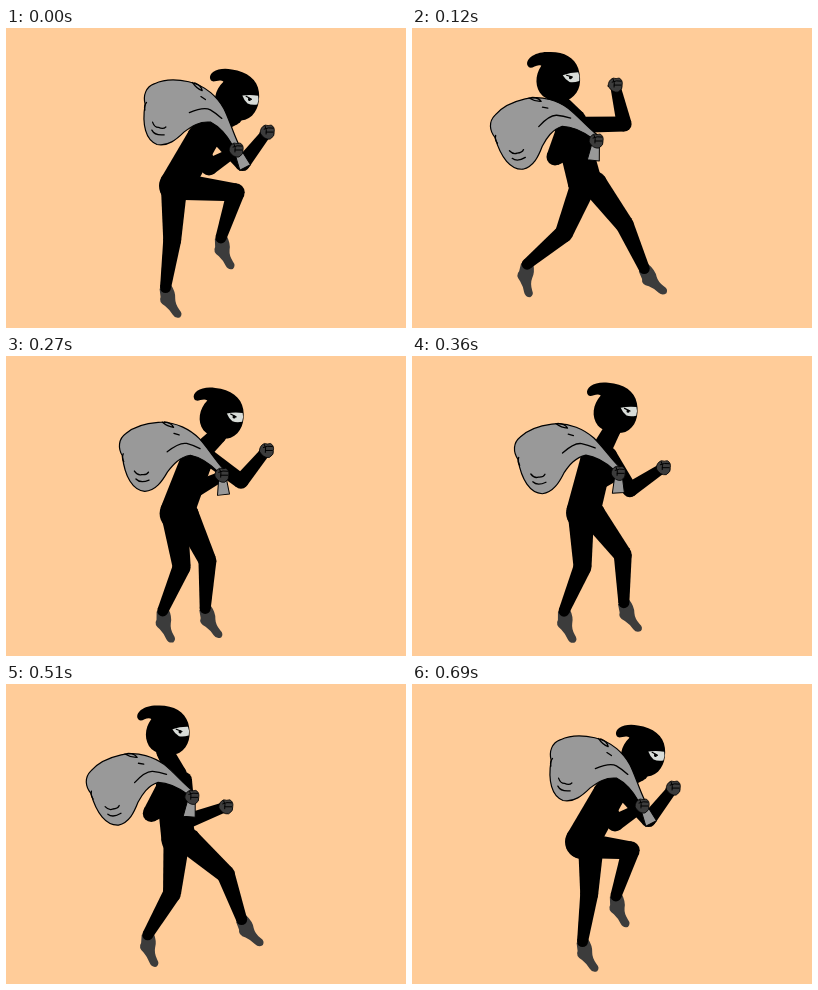
Write an HTML page with a canvas that moves like this. It is 400x300 px and loops after 0.72 s.

```html
<!DOCTYPE html>
<html lang="en">
<head>
<meta charset="utf-8">
<title>Thief on the run</title>
<style>
  html, body { margin: 0; width: 100%; height: 100%; overflow: hidden; background: #fc9; }
  canvas { display: block; }
</style>
</head>
<body>
<canvas id="stage" width="400" height="300"></canvas>
<script>
const ctx = document.getElementById('stage').getContext('2d');
const LOOP = 720, STEP = 30;
const BLACK = '#000', SKIN = '#3c3c3c', SACK = '#999', EYE = '#d8dcd8';
const rad = degrees => degrees * Math.PI / 180;

// Joint angles in degrees at the key times; limbs hang at 0 and swing forward when positive
const KEY_TIMES = [0, 120, 300, 480, 570, 690];
const joints = {
  lean: [35, -14, 33, -12, 8, 35],
  sack: [12, -13, -2, -17, -4, 12],
  upperArm: [42, 91, 46, 2, 14, 42],
  forearm: [142, 193, 130, 110, 111, 142],
  thighA: [-2, -22, 14, -23, 31, 84],
  shinA: [-8, -50, -18, -32, -27, -18],
  thighB: [84, 37, 23, 65, 16, -2],
  shinB: [-18, 24, -8, 20, 18, -8]
};

function poseAt(t) {
  const next = KEY_TIMES.findIndex(k => k > t);
  const i = next < 0 ? KEY_TIMES.length - 1 : next;
  const k = Math.min(1, (t - KEY_TIMES[i - 1]) / (KEY_TIMES[i] - KEY_TIMES[i - 1]));
  const pose = {};
  for (const name in joints) {
    const a = joints[name][i - 1], b = joints[name][i];
    pose[name] = a + (b - a) * k;
  }
  return pose;
}

const shapes = {
  head: new Path2D('M-32-13C-35-19-26-27-12-27C4-28 16-22 20-10C24 2 22 15 12 21C4 25-10 24-17 18C-25 10-25-3-18-13C-22-15-26-11-29-11Q-31-11-32-13Z'),
  eye: new Path2D('M4-3Q12-6 20-6Q22-2 21 3Q15 5 11 4Q7 2 4-3Z'),
  brow: new Path2D('M8-3L14-1'),
  foot: new Path2D('M-6-1L6-1Q8 8 5 14Q3 19 5 26Q7 31 3 33Q-2 33-3 28Q-4 22-7 17Q-12 11-8 7Z'),
  sack: new Path2D('M-98-24C-102-32-101-41-93-46C-85-52-72-55-60-55C-42-55-28-45-20-36C-12-26-6-14 2-4L-4-2C-11-10-19-17-30-20C-41-19-48-12-54-5C-60 4-67 13-78 13C-90 11-97-3-98-24Z'),
  folds: new Path2D('M-97-26Q-99-22-97-18M-54-55Q-47-54-45-49Q-51-50-56-55M-45-43L-40-41M-53-25Q-40-34-33-32Q-27-30-20-26M-87-8Q-84-3-80-4Q-75-3-73-6M-86 0Q-82 5-73 2'),
  tail: new Path2D('M-3 3L4 3L7 21L-5 22Z'),
  hand: new Path2D('M-7 1Q-7-5-2-7Q1-6 4-7Q8-5 7 0Q8 4 3 7Q-3 8-7 1Z'),
  fingers: new Path2D('M-3-3Q1-5 6-4M-1 0L6 0M-2-6Q0-3-1 2')
};

function place(x, y, degrees, draw) {
  ctx.save();
  ctx.translate(x, y);
  ctx.rotate(rad(degrees));
  draw();
  ctx.restore();
}

function fill(shape, color) {
  ctx.fillStyle = color;
  ctx.fill(shape);
}

function line(shape, width) {
  ctx.lineWidth = width;
  ctx.stroke(shape);
}

function bone([x, y], length, degrees) {
  return [x + length * Math.sin(rad(degrees)), y + length * Math.cos(rad(degrees))];
}

// Tapered black limb through points [x, y, radius]
function limb(...points) {
  ctx.fillStyle = BLACK;
  points.forEach(([x, y, r], i) => {
    ctx.beginPath();
    ctx.arc(x, y, r, 0, 7);
    ctx.fill();
    if (!i) return;
    const [px, py, pr] = points[i - 1];
    const d = Math.hypot(x - px, y - py) || 1;
    const nx = (py - y) / d, ny = (x - px) / d;
    ctx.beginPath();
    ctx.moveTo(px + nx * pr, py + ny * pr);
    ctx.lineTo(x + nx * r, y + ny * r);
    ctx.lineTo(x - nx * r, y - ny * r);
    ctx.lineTo(px - nx * pr, py - ny * pr);
    ctx.fill();
  });
}

function leg(hip, thigh, shin) {
  const knee = bone(hip, 51, thigh), ankle = bone(knee, 48, shin);
  place(...ankle, -25 - shin / 2, () => fill(shapes.foot, SKIN));
  limb([...hip, 13], [...knee, 9], [...ankle, 5.5]);
}

function hand(x, y) {
  place(x, y, 0, () => {
    fill(shapes.hand, SKIN);
    line(shapes.hand, 0.8);
    line(shapes.fingers, 1);
  });
}

function draw(pose) {
  const { lean, sack } = pose;
  const rise = (35 - lean) / 49;
  const pull = Math.sin(rise * Math.PI / 2);
  const hip = [170 + 3 * rise, 158 - 3 * rise];
  const head = bone(hip, 108, 180 - lean);
  const shoulder = bone(hip, 55, 182 - 0.9 * lean);
  const grip = [230 - 46 * pull, 120 - 9 * pull];
  const nearElbow = [203 - 60 * pull, 139 - 10 * pull];
  const farShoulder = [shoulder[0] + 12, shoulder[1] - 5];
  const farElbow = bone(farShoulder, 41, pose.upperArm);
  const fist = bone(farElbow, 40, pose.forearm);

  ctx.fillStyle = '#fc9';
  ctx.fillRect(0, 0, 400, 300);
  ctx.strokeStyle = BLACK;
  ctx.lineCap = ctx.lineJoin = 'round';

  leg([hip[0] - 2, hip[1] + 3], pose.thighA, pose.shinA);
  leg([hip[0] + 9, hip[1] + 1], pose.thighB, pose.shinB);
  limb([...farShoulder, 8], [...farElbow, 7.5], [...fist, 5]);
  hand(...fist);
  limb([head[0] - 4, head[1] + 19, 8.5], [shoulder[0] + 5, shoulder[1] - 10, 10],
    [...shoulder, 16], [...hip, 17]);
  limb([shoulder[0] - 7, shoulder[1] + 3, 9], [...nearElbow, 8.5], [grip[0], grip[1] + 3, 5]);

  place(...head, 3 + lean * 0.25, () => {
    ctx.scale(0.97, 0.97);
    fill(shapes.head, BLACK);
    fill(shapes.eye, EYE);
    line(shapes.brow, 1.2);
    ctx.fillStyle = BLACK;
    ctx.beginPath();
    ctx.arc(12, -0.5, 1.6, 0, 7);
    ctx.fill();
  });
  place(...grip, -1.3 * sack - 7, () => {
    fill(shapes.tail, SACK);
    line(shapes.tail, 1);
  });
  place(...grip, sack, () => {
    fill(shapes.sack, SACK);
    line(shapes.sack, 1.2);
    line(shapes.folds, 1.3);
  });
  hand(grip[0], grip[1] + 2);
}

const start = performance.now();
function tick() {
  const t = (performance.now() - start) % LOOP;
  draw(poseAt(Math.floor(t / STEP) * STEP));
  requestAnimationFrame(tick);
}
tick();
</script>
</body>
</html>
```
